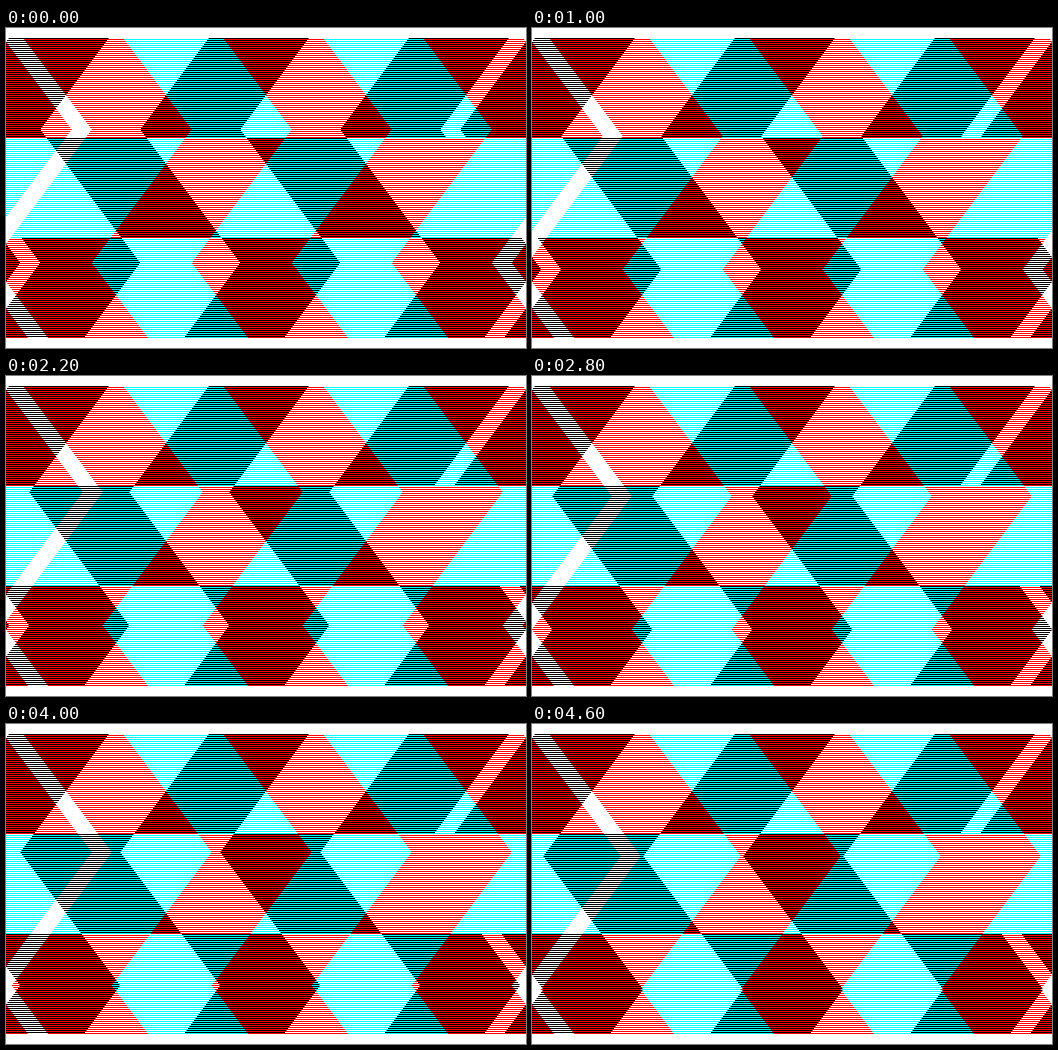
An HTML page with a canvas for the animation above (4800 ms loop, 520 by 320 pixels).

```html
<!DOCTYPE html>
<html lang="en">
<head>
<meta charset="utf-8">
<title>Sliding checkerboard rows</title>
<style>
  html, body { margin: 0; width: 100%; height: 100%; overflow: hidden; background: #fff; }
  canvas { display: block; }
</style>
</head>
<body>
<canvas id="stage" width="520" height="320"></canvas>
<script>
const ctx = document.getElementById('stage').getContext('2d');
const W = 520, H = 320, MARGIN = 10, CELL = 100, COLS = 5;
const STEP = 200, STEPS = 24, SLOPE = 0.75, TRAVEL = 200;

// Even rows slide left, odd rows slide right.
const rowKinds = [
  { dir: -1, colors: ['#000', '#fff'] },
  { dir: 1, colors: ['#f00', '#0ff'] }
];

// Every row travels the same distance, each a little later than the one above.
function slide(y, step) {
  const end = SLOPE * y;
  const moving = 151.5 + 2 * step - end;
  return Math.min(end, Math.max(end - TRAVEL, moving));
}

function drawRow(y, step) {
  const { dir, colors } = rowKinds[y % 2];
  const shift = dir * slide(y, step);
  const band = Math.floor((y - MARGIN) / CELL);
  for (let col = 0; col < COLS; col++) {
    const x = (MARGIN + col * CELL + shift + W) % W;
    // Reach under the next cell so that fractional edges blend without a gap.
    const width = col < COLS - 1 ? CELL + 1 : CELL;
    ctx.fillStyle = colors[(col + band) % 2];
    ctx.fillRect(x, y, width, 1);
    ctx.fillRect(x - W, y, width, 1);
  }
}

function draw(step) {
  ctx.fillStyle = '#fff';
  ctx.fillRect(0, 0, W, H);
  for (let y = MARGIN; y < H - MARGIN; y++) drawRow(y, step);
}

function tick() {
  draw(Math.floor(performance.now() / STEP) % STEPS);
  requestAnimationFrame(tick);
}
tick();
</script>
</body>
</html>
```
